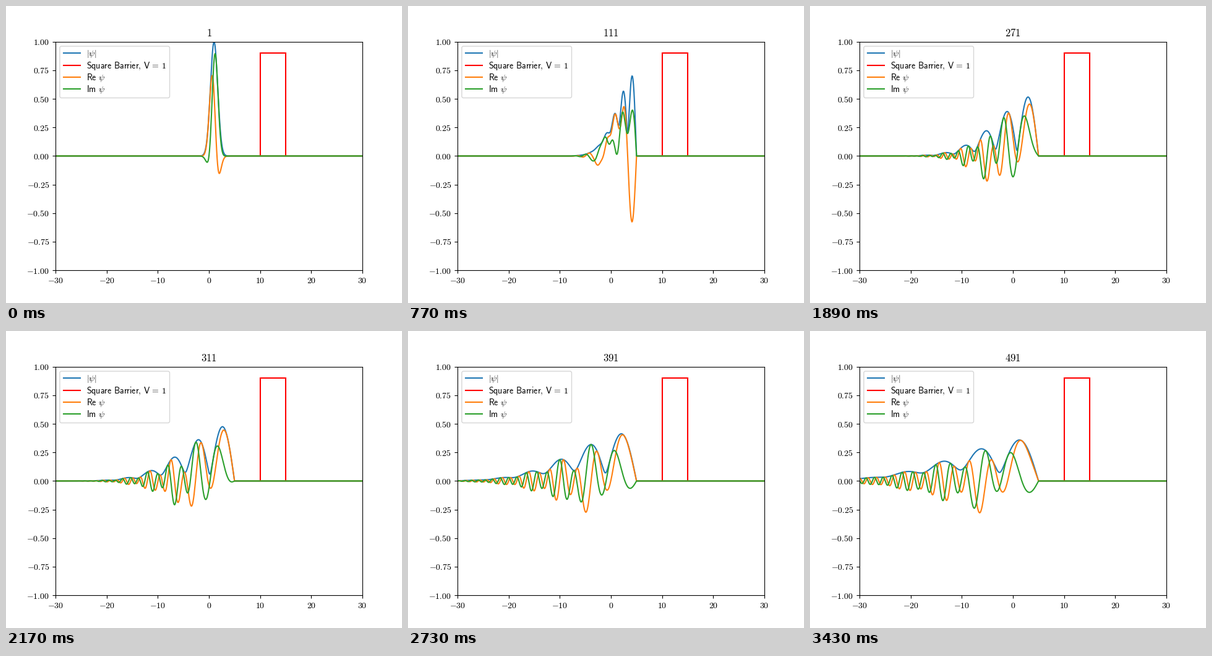
A matplotlib script that plays this animation: 640x480 px, repeating every 3500 ms.

```python
import numpy as np
import matplotlib.pyplot as plt
from matplotlib.animation import FuncAnimation
from matplotlib.patches import FancyBboxPatch

plt.rcParams["mathtext.fontset"] = "cm"

FRAMES, INTERVAL = 50, 70
STEPS_PER_FRAME, DT = 10, 0.01
BLUE, RED, ORANGE, GREEN = "C0", "red", "C1", "C2"

# Free particle left of a hard wall, solved with the sine modes of the grid.
WALL, WIDTH, CELLS = 5.0, 100.0, 1000
DX = WIDTH / CELLS
index = np.arange(1, CELLS)
x_inside = WALL - WIDTH + index * DX
modes = np.sin(np.pi * np.outer(index, index) / CELLS)
packet = np.exp(-(x_inside - 1) ** 2 + 1j * x_inside)
coefficients = modes @ packet * 2 / CELLS
energy = (2 - 2 * np.cos(np.pi * index / CELLS)) / DX**2
step_phase = 2 * np.arctan(energy * DT / 2)  # Crank-Nicolson step
norm = np.sqrt(np.sum(np.abs(packet) ** 2) * DX)

x = np.append(x_inside, [WALL, 30.0])


def wave(step):
    psi = modes @ (coefficients * np.exp(-1j * step * step_phase))
    if step > 0:
        psi = psi / norm
    return np.append(psi, [0, 0])


fig = plt.figure(figsize=(6.4, 4.8), dpi=100)
ax = fig.add_axes([0.125, 0.11, 0.775, 0.77])
ax.set(xlim=(-30, 30), ylim=(-1, 1))
ax.set_xticks(range(-30, 31, 10))
ax.set_yticks(np.linspace(-1, 1, 9))
ax.xaxis.set_major_formatter(lambda v, _: f"${v:.0f}$")
ax.yaxis.set_major_formatter(lambda v, _: f"${v:.2f}$")

modulus, = ax.plot([], [], color=BLUE)
ax.plot([10, 10, 15, 15], [0, 0.9, 0.9, 0], color=RED,
        solid_joinstyle="miter")
real, = ax.plot([], [], color=ORANGE)
imaginary, = ax.plot([], [], color=GREEN)
title = ax.set_title("", fontsize=12, pad=6)


def draw_legend():
    """Legend laid out in stage pixels."""
    overlay = fig.add_axes([0, 0, 1, 1])
    overlay.set(xlim=(0, 640), ylim=(480, 0))
    overlay.axis("off")
    overlay.add_patch(FancyBboxPatch(
        (86.9, 65), 177.6, 83.5, boxstyle="round,pad=0,rounding_size=2.8",
        facecolor="white", edgecolor="0.8", linewidth=1, alpha=0.8))
    gap = r"\hspace{0.38}"
    rows = [
        (76, BLUE, r"$|\psi|$"),
        (96, RED, rf"$\mathsf{{Square}}{gap}\mathsf{{Barrier}},\,"
                  r"\mathsf{V}\,=\,\mathsf{1}$"),
        (115, ORANGE, rf"$\mathsf{{Re}}{gap}\psi$"),
        (134, GREEN, rf"$\mathsf{{Im}}{gap}\psi$"),
    ]
    for y, color, label in rows:
        overlay.plot([92.7, 120.3], [y, y], color=color)
        overlay.text(130.5, y + 4.6, label, fontsize=10, va="baseline")


def update(frame):
    step = frame * STEPS_PER_FRAME
    psi = wave(step)
    modulus.set_data(x, np.abs(psi))
    real.set_data(x, psi.real)
    imaginary.set_data(x, psi.imag)
    title.set_text(rf"$\mathsf{{{step + 1}}}$")
    return modulus, real, imaginary, title


draw_legend()
animation = FuncAnimation(fig, update, frames=FRAMES, interval=INTERVAL,
                          repeat=True, repeat_delay=0)
plt.show()
```
